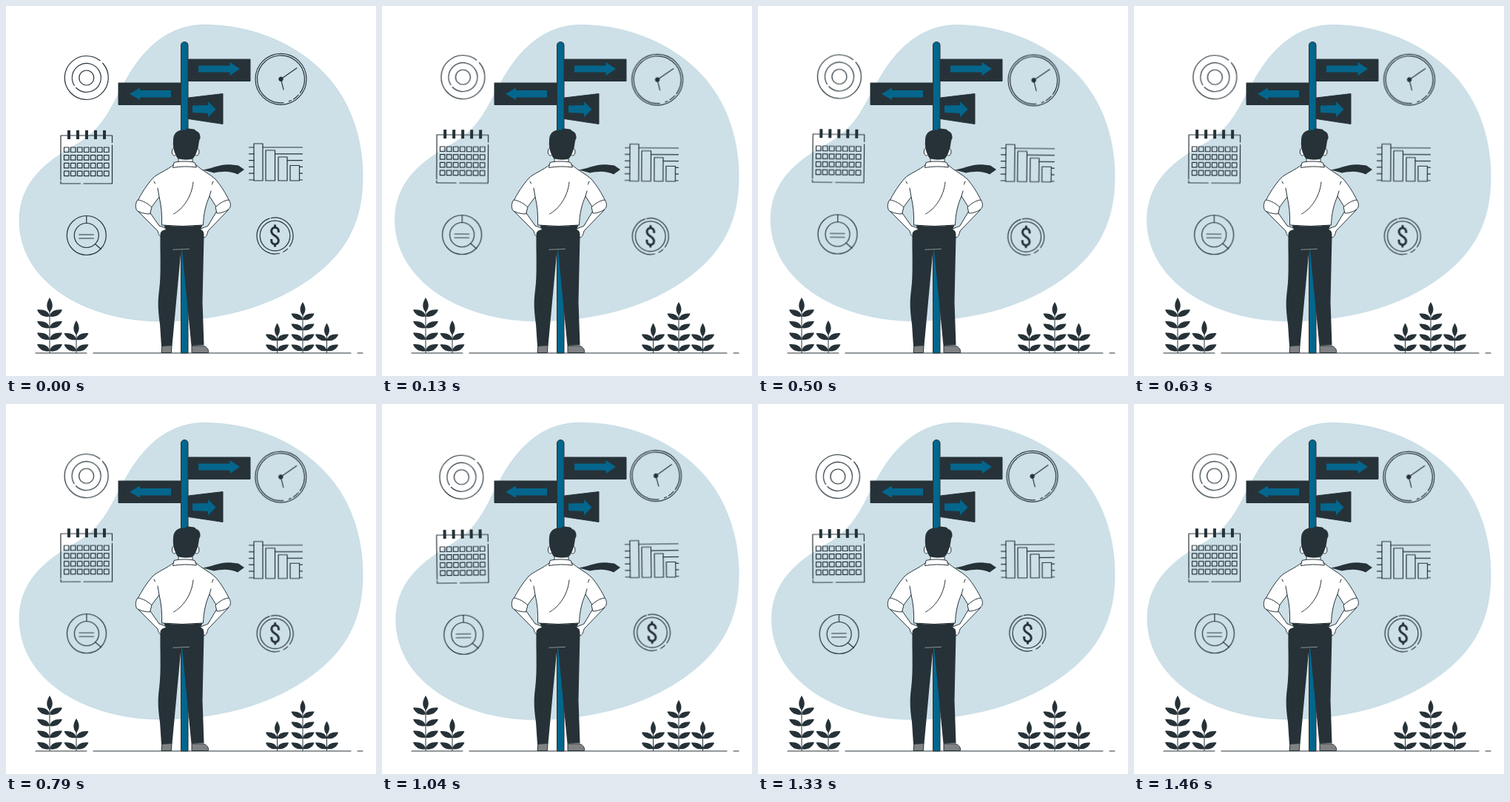
Write an HTML page that moves like this. It is 500 px wide and 500 px high and loops after 1.5 s.

```html
<!DOCTYPE html>
<html lang="en">
<head>
<meta charset="utf-8">
<title>Choosing a direction</title>
<style>
  html, body { margin: 0; width: 100%; height: 100%; overflow: hidden; background: #fff; }
  svg { display: block; width: 100vw; height: 100vh; }
  .sway { animation: wind 1.5s linear infinite; }
  .blob { fill: #cde0e8; stroke: #a6c8d5; stroke-width: .5; transform-origin: 250px 225.5px; }
  .icons { transform-origin: 240px 200.5px; }
  .line { fill: none; stroke: #263238; stroke-width: 1; stroke-linecap: round; stroke-linejoin: round; }
  .icons.line { stroke-width: 1.2; }
  .dark { fill: #263238; }
  .blue { fill: #04668c; }
  .skin { fill: #fff; stroke: #263238; stroke-width: 1; stroke-linejoin: round; }
  @keyframes wind {
    25% { transform: rotate(1deg); }
    75% { transform: rotate(-1deg); }
  }
</style>
</head>
<body>
<svg viewBox="0 0 500 500">
  <defs>
    <path id="tip" d="M0 0C-5 -6 -5 -12 0 -20C5 -12 5 -6 0 0Z"/>
    <g id="pair">
      <path id="leaf" d="M0 1C-1 -6 -8 -9 -17 -8C-14 0 -6 2.5 0 1Z"/>
      <use href="#leaf" transform="scale(-1 1)"/>
    </g>
  </defs>

  <path class="sway blob" d="M268 25.500C345 25.500 415 62 450 116C472 150 482 190 482 230C482 282 466 322 428 355C376 400 300 426 205 426C105 424 18 372 18 289C19 240 50 213 92 189C131 167 140 140 157 110C178 68 212 25.500 268 25.500Z"/>

  <g class="sway icons line">
    <!-- target -->
    <g transform="translate(108.8 97)">
      <circle r="29.5" pathLength="360" stroke-dasharray="350 10" transform="rotate(-42)"/>
      <circle r="19.5" pathLength="360" stroke-dasharray="348 12" transform="rotate(148)"/>
      <circle r="10"/>
    </g>
    <!-- clock -->
    <g transform="translate(371.5 98.8)">
      <circle r="34.5"/>
      <circle r="32" pathLength="360" stroke-dasharray="312 6 16 6 6 14" transform="rotate(84)"/>
      <path d="M3.5 14L0 0L21.5 -15"/>
      <circle r="2.6" class="dark"/>
    </g>
    <!-- calendar -->
    <path d="M74 235V175H143.500V184.500M143.500 188V240H105M100.500 240H74V237"/>
    <path id="rings" stroke-width="4" stroke-linecap="butt"/>
    <path id="days"/>
    <!-- chart -->
    <path id="ticks"/>
    <path d="M335 236V186H347V236ZM351 236V195H363.500V236ZM368 236V204H380V236ZM384 236V215.500H396.500V236Z"/>
    <!-- donut -->
    <g transform="translate(108.8 310)">
      <circle r="26.500"/>
      <circle r="16.500"/>
      <path d="M0 -26.500V-16.500M11.500 11.500L19.500 18.500M-10 -1H9.500M-10 4H9.500"/>
    </g>
    <!-- coin -->
    <g transform="translate(363.5 310.5)">
      <circle r="24.500" pathLength="360" stroke-dasharray="176 6 138 10 16 14" transform="rotate(76)"/>
      <circle r="20.300"/>
      <path stroke-width="3" stroke-linecap="butt" d="M0 -15V-11M0 11V15M4.800 -4.500V-6C4.800 -13 -4.800 -13 -4.800 -6C-4.800 0 4.800 0 4.800 6.500C4.800 13 -4.800 13 -4.800 6.500V4.500"/>
    </g>
  </g>

  <path class="line" stroke-linecap="butt" d="M40 469H109M118 469H466M475 469H482"/>
  <g id="plants" class="dark"></g>

  <!-- signpost -->
  <path class="blue" stroke="#263238" d="M236.500 469V53C236.500 47 246 47 246 53V469Z"/>
  <path class="dark" stroke="#263238" d="M246.500 72H330V101.500H246.500ZM236 104H152V133.500H236ZM246.500 124L293 118.500V159.500L246.500 152.500Z"/>
  <path class="blue" d="M260 80.500H302.500V76L316 85L302.500 94V89.500H260ZM223 114H181V110.500L167 118.800L181 127V123.500H223ZM252 134.500L273 134V129L283.500 139.500L273 150.500V145L252 144Z"/>

  <!-- man -->
  <path class="dark" d="M266 221.500C280 219 289 213.500 303 214.200L314 215.500L322 221L313 227.500C303 222.500 292 223 281 225.500Z"/>
  <g fill="#7f8182" stroke="#263238">
    <path d="M211 458H224L223.500 468.500H210Z"/>
    <path d="M251 459H267C271 461 274 463 273.500 468.500H251Z"/>
  </g>
  <g class="skin">
    <path d="M178 277L205 304C206 309 208 312 211 312L217 302C214 299 210 298 207 297L193 277Z"/>
    <path d="M301 275L273 304C272 309 270 313 267 313L262 302C266 299 270 299 273 297L286 275Z"/>
  </g>
  <path class="dark" d="M208.500 308C208 332 210 362 207 384C204.500 402 206 415 208 430L210 460L224.500 459L236.500 330H238L250.500 459L267.500 458L265.500 400L267.500 310C267.500 305 266 303 263 302L265.500 296H213L216 302C211 303 209 305 208.500 308Z"/>
  <path d="M225.500 329.300L248 328.300" stroke="#8b9195"/>

  <g class="skin">
    <path d="M233 200V215H252V200Z"/>
    <ellipse cx="227.500" cy="197" rx="3.200" ry="5.200"/>
    <ellipse cx="257.800" cy="197" rx="3.200" ry="5.200"/>
    <path d="M227 214C218 222 205 226 198 233C190 242 183 253 177 265L195 274L207 258C210 270 211 283 210.500 296Q238 299 266.500 296C267 281 270 268 275 257L285 273L302 264C297 253 290 242 283 234C276 227 264 222 256 214Z"/>
    <path d="M178 262C185 263 192 267 197 272L194.500 281C188 281 180 279 176.500 276C174.500 271 175 266 178 262Z"/>
    <path d="M301 262C294 263 288 267 283 272L285 280C292 280 299 277 302.500 273C304 269 303.500 265 301 262Z"/>
    <path d="M227 211.500C234 209.500 248 209.500 255 211.500L257.500 218C247 216.500 236 216.500 225.500 218.500Z"/>
  </g>
  <path class="line" d="M253 238C251 259 238 275 226.500 281M200 237L201.500 240M205 246L207 258M277 250L275 257M280 237L278.500 241"/>
  <path class="dark" d="M232 206C228 200 225 192 226 181C226 171 234 166 242 168C243 165 247 165 250 166C254 166 256 167 257 169C261 170 263 174 262.500 179C260 182 261 190 258 196C256 203 253 206 251 207C245 208 237 208 232 206Z"/>
</svg>
<script>
  const el = id => document.getElementById(id);
  const range = n => [...Array(n).keys()];

  el('rings').setAttribute('d', range(5).map(i => `M${85 + i * 12} 168v12`).join(''));
  el('days').setAttribute('d', range(28).map(i =>
    `M${78.5 + i % 7 * 9} ${191 + Math.floor(i / 7) * 10.7}h6.5v6.5h-6.5z`).join(''));

  // gridlines show to the left of the bars and from the last tall bar onward
  const starts = [347, 363.5, 380, 396.5, 396.5, 396.5];
  el('ticks').setAttribute('d', starts.map((x, i) => {
    const y = 191 + i * 8.8;
    return `M328.5 ${y}H335M${x} ${y}H400.5`;
  }).join(''));

  const plant = (x, top, pairs, first, step, size) => {
    const leaves = range(pairs).map(i =>
      `<use href="#pair" transform="translate(${x} ${first + i * step}) scale(${size})"/>`).join('');
    return `<path d="M${x} ${top + 15}V469" stroke="#263238"/>
      <use href="#tip" transform="translate(${x} ${top + 20 * size}) scale(${size})"/>${leaves}`;
  };
  el('plants').innerHTML =
    plant(59, 394, 4, 418.5, 15.6, 1) +
    plant(95, 425, 2, 450, 15.2, .97) +
    plant(366.5, 428.5, 2, 451, 14, .92) +
    plant(401, 400, 4, 423, 14, .92) +
    plant(433.5, 428.5, 2, 451, 14, .92);
</script>
</body>
</html>
```
